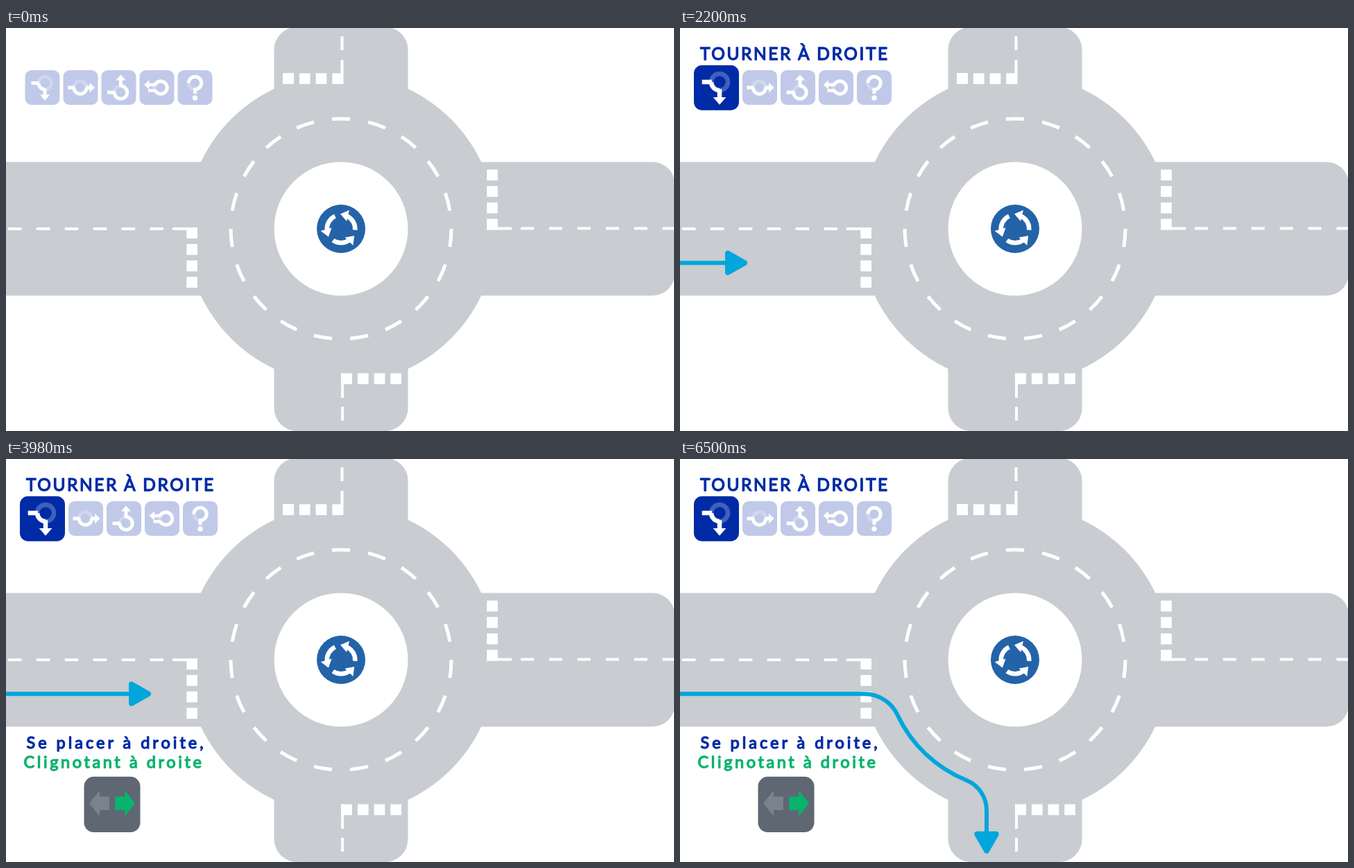
Recreate the animation shown at these times as an HTML page with a canvas. Size 963x582 px, loop 8000 ms.

```html
<!DOCTYPE html>
<html lang="fr">
<head>
<meta charset="utf-8">
<title>Tourner à droite</title>
<style>
  html, body { margin: 0; width: 100%; height: 100%; overflow: hidden; background: #fff; }
  canvas, svg { position: absolute; left: 0; top: 0; display: block; }
  text {
    font-family: Lato, "Open Sans", sans-serif;
    fill: currentColor; stroke: currentColor; stroke-width: 1.3; stroke-linejoin: round;
  }
  .blue { color: #002ba6; }
  .green { color: #08b36d; }
  #title { font-size: 24.5px; letter-spacing: 2.6px; }
  #hint { font-size: 23.5px; }
</style>
</head>
<body>
<canvas id="stage" width="963" height="582"></canvas>
<svg width="963" height="582">
  <text id="title" class="blue" x="29" y="45.8">TOURNER À DROITE</text>
  <g id="hint">
    <text class="blue" x="29.5" y="418" letter-spacing="4">Se placer à droite,</text>
    <text class="green" x="25.5" y="446" letter-spacing="3.6">Clignotant à droite</text>
  </g>
</svg>
<script>
const LOOP = 8000;
const ROAD = '#c9ccd1', SKY = '#00a6dc', SIGN = '#2463a8';
const CX = 483, CY = 290;
const ctx = document.getElementById('stage').getContext('2d');
const title = document.getElementById('title');
const hint = document.getElementById('hint');

const ROUTE = 'M0 339.2 H266 A53 53 0 0 1 313.5 369.5 A187.3 187.3 0 0 0 413 464 A47 47 0 0 1 442 507.5 V600';
const route = document.createElementNS('http://www.w3.org/2000/svg', 'path');
route.setAttribute('d', ROUTE);
const routeShape = new Path2D(ROUTE);

// [time, distance of the arrow head along the route]
const DRIVE = [
  [2050, 44], [2200, 81], [2350, 118], [2490, 156], [2640, 193],
  [5470, 229], [5620, 265], [5770, 348], [5920, 383], [6070, 418],
  [6210, 453.5], [6360, 490], [6500, 567.5]
];
const BLINKS = [3240, 3530, 3980, 4270, 4720];

const rad = deg => deg * Math.PI / 180;

function disc(x, y, r, color) {
  ctx.fillStyle = color;
  ctx.beginPath();
  ctx.arc(x, y, r, 0, 7);
  ctx.fill();
}

function box(x, y, w, h, r, color) {
  ctx.fillStyle = color;
  ctx.beginPath();
  ctx.roundRect(x, y, w, h, r);
  ctx.fill();
}

function poly(points, color) {
  ctx.fillStyle = color;
  ctx.beginPath();
  points.forEach(([x, y]) => ctx.lineTo(x, y));
  ctx.closePath();
  ctx.fill();
}

function arc(x, y, r, from, to, width, color) {
  ctx.strokeStyle = color;
  ctx.lineWidth = width;
  ctx.beginPath();
  ctx.arc(x, y, r, rad(from), rad(to));
  ctx.stroke();
}

function bar(x1, y1, x2, y2, width = 5) {
  ctx.strokeStyle = '#fff';
  ctx.lineWidth = width;
  ctx.beginPath();
  ctx.moveTo(x1, y1);
  ctx.lineTo(x2, y2);
  ctx.stroke();
}

function drawRoads() {
  box(386.5, -1.5, 193, 583.5, 33, ROAD);
  box(-50, 193.5, 1014, 193, 32, ROAD);
  disc(CX, CY, 224, ROAD);
  disc(CX, CY, 96.5, '#fff');

  const step = 360 / 19;
  for (let i = 0; i < 19; i++) {
    const mid = i * step - 90;
    arc(CX, CY, 159, mid - step / 4, mid + step / 4, 5, '#fff');
  }

  for (let i = 0; i < 4; i++) {
    const k = i * 23.7;
    box(260.3, 288.3 + k, 15.7, 15.7, 0, '#fff');
    box(693.2, 204.5 + k, 15.7, 15.7, 0, '#fff');
    box(399.2, 65.3, 15.7, 15.7, 0, '#fff');
    box(399.2 + k, 65.3, 15.7, 15.7, 0, '#fff');
    box(483.2 + k, 498.6, 15.7, 15.7, 0, '#fff');
  }

  bar(240, 290, 276, 290, 4);
  bar(693, 289.4, 729, 289.4, 4);
  bar(484.5, 46, 484.5, 81, 4);
  bar(485, 498.6, 485, 534, 4);
  for (let i = 0; i < 6; i++) {
    bar(3 + i * 40.9, 290, 22.5 + i * 40.9, 290, 4);
    bar(742 + i * 40.9, 289.4, 761 + i * 40.9, 289.4, 4);
  }
  bar(484.5, 12, 484.5, 32, 4);
  bar(485, 547, 485, 567, 4);
}

function drawSign() {
  disc(CX, CY, 35, SIGN);
  for (let i = 0; i < 3; i++) {
    ctx.save();
    ctx.translate(CX, CY);
    ctx.rotate(rad(120 * i));
    arc(0, 0, 20.3, -65, 5, 6.5, '#fff');
    poly([[-1, -21.5], [12, -27], [8, -11]], '#fff');
    ctx.restore();
  }
}

// Ring whose white part runs from one angle to another; the rest is faint
function ring(x, y, from, to) {
  arc(x, y, 9.2, to, from + 360, 5, 'rgba(255,255,255,.25)');
  arc(x, y, 9.2, from, to, 5, '#fff');
}

const ICONS = [
  () => {
    ring(28.5, 18.6, 90, 180);
    bar(9, 18.6, 20, 18.6);
    bar(28.5, 26.5, 28.5, 36);
    poly([[21.3, 35.5], [35.7, 35.5], [28.5, 43.8]], '#fff');
  },
  () => {
    ring(24.5, 25, 0, 180);
    bar(6.5, 25, 16.5, 25);
    bar(32.5, 25, 39, 25);
    poly([[38, 17.8], [38, 32.2], [45.7, 25]], '#fff');
  },
  () => {
    ring(28, 32, -90, 180);
    bar(8.5, 32, 20, 32);
    bar(28, 24, 28, 14);
    poly([[20.8, 14.5], [35.2, 14.5], [28, 6.5]], '#fff');
  },
  () => {
    ring(30.5, 25, -155, 155);
    bar(13, 21, 23, 21, 4.5);
    bar(12.5, 29.3, 23, 29.3, 4.5);
    poly([[13.8, 14.3], [13.8, 27.5], [6.5, 21]], '#fff');
  },
  () => {
    ring(25, 18.5, -180, 90);
    bar(25, 25.5, 25, 34);
    disc(25, 40, 3.7, '#fff');
  }
];

function drawIcons(p) {
  const mix = (a, b) => Math.round(a + (b - a) * p);
  const active = `rgb(${mix(193, 0)},${mix(201, 43)},${mix(233, 166)})`;
  ICONS.forEach((draw, i) => {
    const grow = i ? 0 : p;
    const x = 27.5 + 55 * i + (i ? 7.5 : -7.5) * p;
    ctx.save();
    ctx.translate(x, 61 - 7.2 * grow);
    ctx.scale(1 + .3 * grow, 1 + .3 * grow);
    box(0, 0, 50, 50, 9, i ? '#c1c9e9' : active);
    draw();
    ctx.restore();
  });
}

function drawBlinker(on) {
  const arrow = (x, dir, color) => poly([
    [x, 497.3], [x - 15 * dir, 478.5], [x - 15 * dir, 487.5], [x - 29 * dir, 487.5],
    [x - 29 * dir, 507], [x - 15 * dir, 507], [x - 15 * dir, 516]
  ], color);
  box(112.5, 458.8, 81, 80.2, 14, '#5e6772');
  arrow(120, -1, '#7a828b');
  arrow(186.2, 1, on ? '#08b36d' : '#7a828b');
}

function drawArrow(dist) {
  ctx.strokeStyle = ctx.fillStyle = SKY;
  ctx.lineWidth = 6;
  ctx.setLineDash([dist, 2000]);
  ctx.stroke(routeShape);
  ctx.setLineDash([]);

  const a = route.getPointAtLength(dist - 1);
  const b = route.getPointAtLength(dist + 1);
  ctx.save();
  ctx.translate((a.x + b.x) / 2, (a.y + b.y) / 2);
  ctx.rotate(Math.atan2(b.y - a.y, b.x - a.x));
  ctx.lineWidth = 8;
  ctx.lineJoin = 'round';
  ctx.beginPath();
  ctx.moveTo(-12, -13.7);
  ctx.lineTo(12, 0);
  ctx.lineTo(-12, 13.7);
  ctx.closePath();
  ctx.fill();
  ctx.stroke();
  ctx.restore();
}

function render(t) {
  ctx.fillStyle = '#fff';
  ctx.fillRect(0, 0, 963, 582);
  drawRoads();
  drawSign();

  const p = [1000, 1150, 1300].filter(s => t >= s).length / 3;
  drawIcons(p);
  title.setAttribute('transform', `translate(0 ${-52.5 * (1 - p)})`);
  title.style.visibility = p ? 'visible' : 'hidden';

  const told = t >= 2790;
  hint.style.visibility = told ? 'visible' : 'hidden';
  if (told) drawBlinker(BLINKS.filter(s => t >= s).length % 2 === 1);

  const reached = DRIVE.filter(([s]) => t >= s).pop();
  if (reached) drawArrow(reached[1]);
}

const start = performance.now();
function tick() {
  render((performance.now() - start) % LOOP);
  requestAnimationFrame(tick);
}
tick();
</script>
</body>
</html>
```
